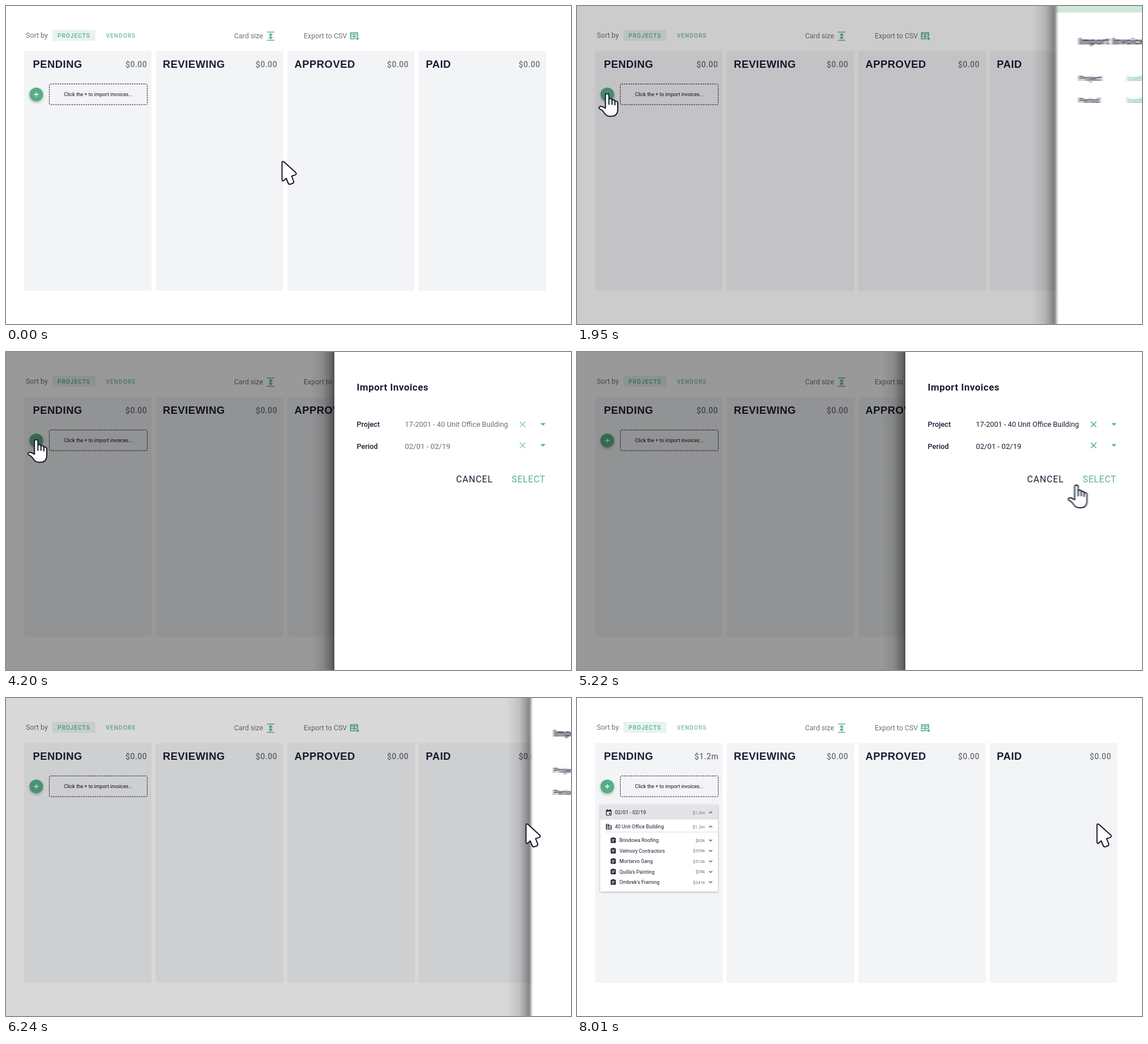
Recreate the animation shown at these times as an HTML page. Size 998 by 561 pixels, loop 8040 ms.

```html
<!DOCTYPE html>
<html lang="en">
<head>
<meta charset="utf-8">
<title>Invoice board</title>
<style>
html, body { margin: 0; width: 100%; height: 100%; overflow: hidden; background: #fff; }
svg { display: block; width: 100%; height: 100%; }
text { font-family: Roboto, sans-serif; white-space: pre; }
.head { font: 700 18.4px "Liberation Sans", Arial, sans-serif; letter-spacing: .5px; }
</style>
</head>
<body>
<svg viewBox="0 0 998 561" xmlns="http://www.w3.org/2000/svg">
  <defs>
    <linearGradient id="edge">
      <stop offset="0" stop-opacity="0"/>
      <stop offset=".5" stop-opacity=".1"/>
      <stop offset=".85" stop-opacity=".32"/>
      <stop offset="1" stop-opacity=".5"/>
    </linearGradient>
    <filter id="soft" x="-30%" y="-30%" width="160%" height="160%">
      <feDropShadow dx="0" dy="2" stdDeviation="2.2" flood-color="#203a30" flood-opacity=".38"/>
    </filter>
    <filter id="lift" x="-10%" y="-10%" width="120%" height="120%">
      <feDropShadow dx="0" dy="1" stdDeviation="1.6" flood-opacity=".36"/>
    </filter>
    <filter id="panelBlur" filterUnits="userSpaceOnUse" x="-60" y="-20" width="700" height="601" color-interpolation-filters="sRGB">
      <feGaussianBlur stdDeviation="0"/>
    </filter>
    <filter id="cursorBlur" filterUnits="userSpaceOnUse" x="-50" y="-50" width="100" height="100" color-interpolation-filters="sRGB">
      <feGaussianBlur stdDeviation="0"/>
    </filter>
    <clipPath id="panelClip"><rect width="470" height="561"/></clipPath>
  </defs>
  <rect width="998" height="561" fill="#fff"/>
  <g id="board"></g>
  <g id="card" filter="url(#lift)"></g>
  <rect id="dim" width="998" height="561"/>
  <g id="panel"></g>
  <g id="cursor" stroke="#17172e" stroke-width="2" stroke-linejoin="round" stroke-linecap="round" fill="#fff">
    <path id="arrow" d="M-12.5 -19Q-12.5 -22 -9 -20L12 -1Q14 2 10 3.4L4.5 5L8 14Q9 17 6 18L2.5 19.4Q-.3 20.3 -1.5 17.5L-5 9L-9.5 13Q-12.5 14.5 -12.5 11Z"/>
    <path id="hand" d="M-5.8 -17Q-5.8 -20 -2.7 -20Q.4 -20 .4 -17V-9Q.9 -11.3 3.2 -11.2Q5.8 -11 5.8 -8Q6.4 -9.4 8.3 -9.2Q10.9 -8.8 10.9 -6Q11.7 -7 13.4 -6.6Q16 -6 16 -3V7Q16 20 5 20H2Q-4 20 -7.5 14.5Q-11 9 -15.3 7.4Q-18 6 -16.6 3.6Q-14 1.4 -10 3.6L-5.8 6ZM.4 -9V-1M5.8 -8V-1M10.9 -6V0"/>
  </g>
</svg>
<script>
const LOOP = 8040, GREEN = '#57b189', INK = '#1c1c33', GREY = '#707278';
const $ = id => document.getElementById(id);

const text = (x, y, str, size, fill, more = '') =>
  `<text x="${x}" y="${y}" font-size="${size}" fill="${fill}" ${more}>${str}</text>`;
const rect = (x, y, w, h, fill, more = '') =>
  `<rect x="${x}" y="${y}" width="${w}" height="${h}" fill="${fill}" ${more}/>`;
const line = (d, stroke, width, more = '') =>
  `<path d="${d}" fill="none" stroke="${stroke}" stroke-width="${width}" ${more}/>`;
const spaced = (px, weight = 500) => `letter-spacing="${px}" font-weight="${weight}"`;
const amount = (x, str, id = '') => text(x, 107.5, str, 14, GREY, spaced(.5) + id);

function drawBoard() {
  const columns = [
    [32, 47.5, 211, 'PENDING'], [264.5, 277, 441, 'REVIEWING'],
    [497, 509.5, 673, 'APPROVED'], [729, 741.5, 905.5, 'PAID']
  ];
  let s = text(35, 56, 'Sort by', 12.4, GREY) +
    rect(82, 42, 76, 19.5, '#e8f4ee', 'rx="1"') +
    text(91, 56, 'PROJECTS', 10, GREEN, spaced(1.1)) +
    text(176.5, 56, 'VENDORS', 10, '#74bc9b', spaced(1.1)) +
    text(403, 57, 'Card size', 12.4, GREY) +
    text(526, 57, 'Export to CSV', 12.4, GREY) +
    line('M461 46H474M461 60.5H474M467.5 49.5V57M464.5 51.8L467.5 48.8L470.5 51.8M464.5 54.7L467.5 57.7L470.5 54.7', GREEN, 1.7) +
    line('M615 58H608.5V47H621V54M608.5 49.5H621M608.5 53.5H621M614.8 49V58M616 57.5H622M620 55L622.6 57.5L620 60', GREEN, 1.7);
  columns.forEach(([x, tx, ax, name], i) => {
    s += rect(x, 79.5, 225, 423, '#f3f4f6', 'rx="2"') +
      `<text class="head" x="${tx}" y="109" fill="${INK}">${name}</text>` +
      amount(ax, '$0.00', i ? '' : ' id="zero"');
  });
  s += amount(207.5, '$1.2m', ' id="total"') +
    `<circle cx="53.5" cy="156" r="12" fill="#57ae86" filter="url(#soft)"/>` +
    line('M49.5 156H57.5M53.5 152V160', '#fff', 1.3) +
    rect(76.5, 137.5, 173, 36.5, 'none', 'rx="2" stroke="#14141f" stroke-dasharray="2.6 1.5"') +
    text(163, 158.7, 'Click the + to import invoices...', 8.85, '#101018', 'text-anchor="middle"');
  $('board').innerHTML = s;
}

function drawCard() {
  const vendors = [
    ['Brindowa Roofing', '$63k'], ['Velmory Contractors', '$329k'], ['Mortarvo Gang', '$512k'],
    ["Quilla's Painting", '$55k'], ["Ombrek's Framing", '$241k']
  ];
  const price = (y, str, dir) =>
    text(226, y + 2.8, str, 7.7, GREY, 'text-anchor="end"') +
    line(`M233.2 ${y - 1.3 * dir}L236 ${y + 1.5 * dir}L238.8 ${y - 1.3 * dir}`, '#44464f', 1.1);
  let s = rect(41, 188.5, 208, 153, '#fff', 'rx="2"') +
    rect(41, 188.5, 208, 26, '#e3e4e6') +
    rect(51.8, 198, 8.6, 9, 'none', `rx="1" stroke="${INK}" stroke-width="1.2"`) +
    line('M51.8 199.3H60.4M53.8 196.5V199M58.4 196.5V199', INK, 1.8) +
    rect(56.5, 203, 2.3, 2.3, INK) +
    text(67, 205.3, '02/01 - 02/19', 9, INK) + price(202, '$1.2m', -1) +
    line('M51.7 222.8H56V231.5H51.7ZM56 225H60.7V231.5H56M51.7 225.7H56M51.7 228.5H56M58 227.3H59.3M58 229.4H59.3', INK, 1.2) +
    text(67, 230.3, '40 Unit Office Building', 8.8, INK) + price(227, '$1.2m', -1) +
    rect(50, 236, 199, 1, '#dcdde0');
  vendors.forEach(([name, sum], i) => {
    const y = 251 + 18.45 * i;
    s += rect(59.5, y - 4.3, 9, 9, INK, 'rx="1"') + rect(62.5, y - 5.3, 3, 2, INK, 'rx="1"') +
      line(`M61.5 ${y - 1.6}H66.5M61.5 ${y + .3}H66.5M61.5 ${y + 2.2}H65`, '#fff', .9) +
      text(75, y + 3.2, name, 8.8, INK) + price(y, sum, 1);
  });
  $('card').innerHTML = s;
}

function drawPanel() {
  const cross = y => line(`M327.7 ${y - 4.8}l9.6 9.6m0 -9.6l-9.6 9.6`, GREEN, 1.5);
  const caret = y => `<path d="M364 ${y}h9l-4.5 4.6z" fill="${GREEN}"/>`;
  $('panel').innerHTML =
    rect(-42, 0, 42, 561, 'url(#edge)', 'id="shade"') +
    rect(0, 0, 470, 561, '#fff') +
    `<g id="bar" clip-path="url(#panelClip)">${rect(0, 0, 470, 11.5, '#cde7d9')}${rect(0, 0, 111, 11.5, '#5fb28b', 'id="runner"')}</g>` +
    text(39.5, 68.3, 'Import Invoices', 17, INK, spaced(.5, 700)) +
    text(39.5, 132, 'Project', 12.8, INK, spaced(0)) +
    text(39.5, 170.5, 'Period', 12.8, INK, spaced(0)) +
    `<g id="loading">${text(124.5, 132, 'loading...', 12.9, GREEN)}${text(124.5, 170.5, 'loading...', 13.1, GREEN)}</g>` +
    `<g id="values">${text(124.5, 132, '17-2001 - 40 Unit Office Building', 12.8, INK)}${text(124.5, 170.5, '02/01 - 02/19', 13.2, INK)}${cross(127.7)}${cross(164.7)}</g>` +
    caret(125.5) + caret(162.5) +
    text(215, 229.7, 'CANCEL', 15.7, INK, spaced(1, 400) + ' id="cancel"') +
    text(313.3, 229.7, 'SELECT', 15.6, GREEN, spaced(.85, 400));
}

const ramp = (t, a, b) => Math.min(1, Math.max(0, (t - a) / (b - a)));
const sine = p => (1 - Math.cos(Math.PI * p)) / 2;
const quad = p => p < .5 ? 2 * p * p : 1 - 2 * (1 - p) ** 2;
const bezier = (pts, t) => [0, 1].map(k => {
  const u = 1 - t;
  return u ** 3 * pts[0][k] + 3 * u * u * t * pts[1][k] + 3 * u * t * t * pts[2][k] + t ** 3 * pts[3][k];
});

const TO_PLUS = [[500, 295], [440, 335], [-20, 195], [56, 174.5]];
const TO_SELECT = [[56, 174.5], [300, 215], [985, 282], [931, 243]];
const cursorAt = t => t < 3000
  ? bezier(TO_PLUS, sine(ramp(t, 120, 1530)))
  : bezier(TO_SELECT, sine(ramp(t, 4230, 5634)));
const openness = t => quad(ramp(t, 1680, 2317)) - quad(ramp(t, 5789, 6426));
const press = (t, at) => Math.sin(Math.PI * ramp(t, at, at + 150));

const show = (id, on) => $(id).setAttribute('visibility', on ? 'visible' : 'hidden');
const fade = (id, v) => $(id).setAttribute('opacity', v);

// Motion blur from the distance covered in 30 ms
function smear(el, filter, dx, dy, k) {
  const x = Math.abs(dx) * k, y = Math.abs(dy) * k;
  if (x + y < .25) return el.removeAttribute('filter');
  $(filter).firstElementChild.setAttribute('stdDeviation', `${x} ${y}`);
  el.setAttribute('filter', `url(#${filter})`);
}

function render(t) {
  const open = openness(t), panel = $('panel');
  show('panel', open > 0);
  panel.setAttribute('transform', `translate(${998 - 418 * open} 0)`);
  smear(panel, 'panelBlur', 418 * (open - openness(t - 30)), 0, .08);
  fade('shade', Math.min(1, open * 8));
  fade('dim', .4 * (ramp(t, 1650, 2250) - ramp(t, 5870, 6474)));

  const loaded = t >= 4080;
  fade('bar', loaded ? 0 : 1);
  fade('loading', loaded ? 0 : 1);
  $('runner').setAttribute('x', 9 + (t - 2580) * .288);
  fade('values', loaded ? .3 + .7 * ramp(t, 4080, 4330) : 0);
  $('cancel').setAttribute('fill', loaded ? INK : '#808288');

  const filled = ramp(t, 6560, 7040);
  fade('card', filled);
  fade('total', filled);
  fade('zero', 1 - filled);

  const [x, y] = cursorAt(t), [px, py] = cursorAt(t - 30), hand = t >= 1380 && t < 5800;
  const scale = 1 - .1 * (press(t, 1530) + press(t, 5640));
  $('cursor').setAttribute('transform', `translate(${x} ${y}) scale(${scale})`);
  smear($('cursor'), 'cursorBlur', x - px, y - py, .07);
  $('hand').style.display = hand ? '' : 'none';
  $('arrow').style.display = hand ? 'none' : '';
}

drawBoard();
drawCard();
drawPanel();
const start = performance.now();
(function tick() {
  render((performance.now() - start) % LOOP);
  requestAnimationFrame(tick);
})();
</script>
</body>
</html>
```
